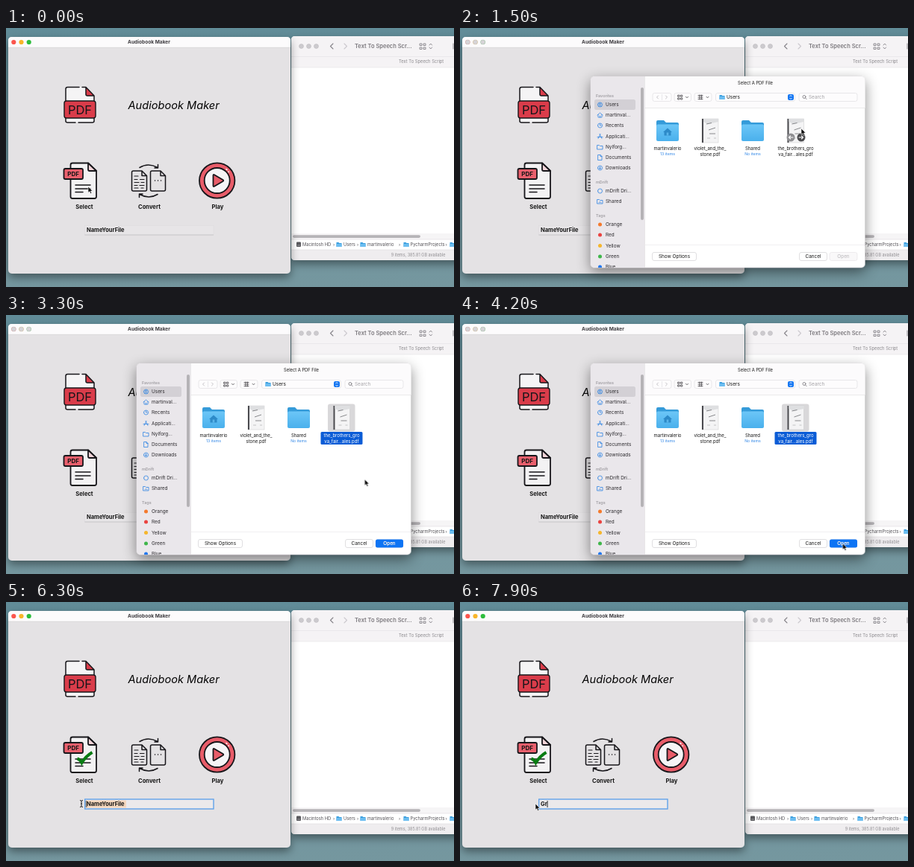
Animation of 600 by 348 pixels, one loop 8 s. Source, as an HTML page:

```html
<!DOCTYPE html>
<html lang="en">
<head>
<meta charset="utf-8">
<title>Audiobook Maker</title>
<style>
html, body { margin: 0; width: 100%; height: 100%; overflow: hidden; background: #5f8894; }
svg { display: block; }
text { font-family: Inter, Roboto, sans-serif; fill: #161616; }
.mid { text-anchor: middle; }
.bold { font-weight: 700; }
.semi { font-weight: 600; }
.line { fill: none; stroke: #17161a; stroke-width: 1.8; stroke-linecap: round; stroke-linejoin: round; }
.thin { fill: none; stroke: #858388; stroke-width: .9; stroke-linecap: round; stroke-linejoin: round; }
.blue { fill: none; stroke: #2f84e2; stroke-width: .8; stroke-linecap: round; stroke-linejoin: round; }
.path text { font-size: 5.75px; fill: #514f54; }
.files text { font-size: 6px; text-anchor: middle; }
.files .sub { font-size: 5.2px; fill: #2f86e6; }

.step, .glide { animation: 8s infinite; }
.step { animation-timing-function: step-end; }
.glide { animation-timing-function: ease-in-out; }
.panel { animation-name: panel; }
.picked { animation-name: picked; }
.hover { animation-name: hover; }
.tick { animation-name: tick; }
.focus { animation-name: focus; }
.name { animation-name: name; }
.first { animation-name: first; }
.second { animation-name: second; }
.arrow { animation-name: arrow; }
.beam { animation-name: beam; }
.pointer { animation-name: pointer; }
.marked { animation-name: marked; transform-origin: 161px 0; }
.caret { animation-name: caret; }
@keyframes panel { 0%, 58.75% { opacity: 0 } 6.25% { opacity: 1 } }
@keyframes picked { 0% { opacity: 0 } 22.5%, 100% { opacity: 1 } }
@keyframes hover { 0%, 37.5% { opacity: 0 } 16.25% { opacity: 1 } }
@keyframes tick { 0% { opacity: 0 } 58.75%, 100% { opacity: 1 } }
@keyframes focus { 0% { opacity: 0 } 71.25%, 100% { opacity: 1 } }
@keyframes name { 0% { opacity: 1 } 95%, 100% { opacity: 0 } }
@keyframes first { 0% { opacity: 0 } 95%, 100% { opacity: 1 } }
@keyframes second { 0% { opacity: 0 } 97.5%, 100% { opacity: 1 } }
@keyframes arrow { 0%, 81.25%, 100% { opacity: 1 } 69% { opacity: 0 } }
@keyframes beam { 0%, 81.25%, 100% { opacity: 0 } 69% { opacity: 1 } }
@keyframes pointer {
  0%, 8.75% { transform: translate(110px, 213px) }
  17.5%, 20% { transform: translate(457px, 135px) }
  26%, 35% { transform: translate(448px, 134px) }
  47.5%, 58.75% { transform: translate(512.5px, 307px) }
  61.25%, 62.5% { transform: translate(514px, 305px) }
  70%, 72.5% { transform: translate(162px, 271px) }
  77.5%, 100% { transform: translate(101px, 271px) }
}
@keyframes marked {
  0%, 72.5% { transform: scaleX(0) }
  77.5%, 100% { transform: scaleX(1) }
}
@keyframes caret {
  0%, 72.5% { transform: translateX(161px) }
  77.5% { transform: translateX(107.5px); animation-timing-function: step-end }
  95% { transform: translateX(114px); animation-timing-function: step-end }
  97.5%, 100% { transform: translateX(117px) }
}
</style>
</head>
<body>
<svg width="600" height="348" viewBox="0 0 600 348">
  <defs>
    <linearGradient id="desk" x2="0" y2="1">
      <stop stop-color="#618c98"/><stop offset="1" stop-color="#75979f"/>
    </linearGradient>
    <linearGradient id="sky" x2="0" y2="1">
      <stop stop-color="#6cc6f7"/><stop offset="1" stop-color="#4ab0ec"/>
    </linearGradient>
    <filter id="soft" x="-10%" y="-10%" width="120%" height="125%">
      <feDropShadow dx="0" dy="5" stdDeviation="6" flood-opacity=".42"/>
    </filter>
    <filter id="deep" x="-12%" y="-12%" width="124%" height="130%">
      <feDropShadow dx="0" dy="6" stdDeviation="9" flood-opacity=".45"/>
    </filter>
    <clipPath id="frame"><rect x="175" y="65" width="367.5" height="257" rx="5"/></clipPath>
    <g id="folder">
      <path d="M-15-12q0-2 2-2h8l3 3H13q2 0 2 2V-5H-15z" fill="#359bd9"/>
      <rect x="-15" y="-8.5" width="30" height="22.5" rx="2" fill="url(#sky)"/>
    </g>
    <g id="dir">
      <path d="M-3.5-3h3l1 1h3v5h-7z" fill="#3b9fdf"/><path d="M-3.5-1h7v4h-7z" fill="#6bbdf0"/>
    </g>
    <g id="book">
      <rect x="-11" y="-16" width="22" height="32" fill="#f4f4f5" stroke="#c9c9cb" stroke-width=".5"/>
      <path d="M-11-16h2v32h-2z" fill="#4a4a4e"/>
      <path d="M-9-16H11v4L-3-9l-6-3z" fill="#dedfe1"/>
      <path d="M-5-9l7-1.500M-2-1l9-3M-1 4h8" fill="none" stroke="#6d6e72" stroke-width=".8"/>
      <path d="M-4 10h4M5 10h3" stroke="#b4b5b8" stroke-width=".8"/>
    </g>
  </defs>

  <rect width="600" height="348" fill="url(#desk)"/>

  <!-- File browser window -->
  <g filter="url(#soft)"><rect x="382" y="11" width="240" height="301" rx="5" fill="#fff"/></g>
  <path d="M382 53V16q0-5 5-5H600V53z" fill="#f5f3f5"/>
  <path d="M382 38.5H600M382 53H600" stroke="#e3e1e4" stroke-width=".6"/>
  <g fill="#cccace" stroke="#b9b7bb" stroke-width=".5">
    <circle cx="395.5" cy="24.5" r="3"/><circle cx="405.5" cy="24.5" r="3"/><circle cx="415.5" cy="24.5" r="3"/>
  </g>
  <path class="thin" d="M438 21l-3.5 3.5L438 28" style="stroke-width:1.1"/>
  <path class="thin" d="M453 21l3.5 3.5L453 28" style="stroke:#cbc9cd;stroke-width:1.1"/>
  <text x="467" y="27.2" font-size="7.5" class="semi" style="fill:#7c797e">Text To Speech Scr...</text>
  <path class="thin" d="M554.5 21h2.5v2.5h-2.5zM559.5 21h2.5v2.5h-2.5zM554.5 26h2.5v2.5h-2.5zM559.5 26h2.5v2.5h-2.5zM567 23l1.8-2 1.8 2M567 26l1.8 2 1.8-2M599 21v7"/>
  <text x="526" y="47.2" font-size="5.8" style="fill:#8a888c">Text To Speech Script</text>
  <path d="M382 276H600V284H382z" fill="#f6f5f6"/>
  <rect x="384" y="278.3" width="171" height="3.6" rx="1.8" fill="#b6b4b7"/>
  <path d="M382 298H600V312H387q-5 0-5-5z" fill="#efedef"/>
  <path d="M382 284H600M382 298H600" stroke="#dddbde" stroke-width=".6"/>
  <g class="path">
    <rect x="389" y="287.5" width="6" height="6.5" rx="1" fill="#59595d"/><path d="M390 292h4" stroke="#bbb" stroke-width=".7"/>
    <text x="397" y="293">Macintosh HD</text><text x="438" y="293">›</text>
    <use href="#dir" x="446" y="291"/><text x="452" y="293">Users</text><text x="470" y="293">›</text>
    <use href="#dir" x="478" y="291"/><text x="484" y="293">martinvalerio</text><text x="526" y="293">›</text>
    <use href="#dir" x="536" y="291"/><text x="541.5" y="293">PycharmProjects</text><text x="588.5" y="293">›</text>
    <use href="#dir" x="598" y="291"/>
    <text x="552" y="307" class="mid" style="font-size:5.5px;fill:#908e92">9 items, 385.81 GB available</text>
  </g>

  <!-- Main window -->
  <g filter="url(#soft)"><rect x="3" y="12" width="378" height="318" rx="5" fill="#e4e2e4"/></g>
  <path d="M3 26V17q0-5 5-5H376q5 0 5 5V26z" fill="#fcfbfc"/>
  <path d="M3 26.2H381" stroke="#d5d3d6" stroke-width=".6"/>
  <circle cx="10.3" cy="19" r="3.1" fill="#fb554d"/><circle cx="20.5" cy="19" r="3.1" fill="#f8b52a"/><circle cx="30.7" cy="19" r="3.1" fill="#2ebd3d"/>
  <text x="191.5" y="21.2" font-size="6.6" class="mid bold" style="fill:#3d3b3f">Audiobook Maker</text>
  <text x="163.5" y="109" font-size="14.6" font-style="italic" style="fill:#050505">Audiobook Maker</text>

  <g>
    <path d="M80 98V82q0-2.500 2.500-2.500H107L118 91V125q0 2-2.500 2H82.500Q80 127 80 125z" fill="#f5f4f5"/>
    <path d="M107 79.500L118 91H109q-2 0-2-2z" fill="#da3c4a"/>
    <path class="line" style="stroke-width:1.5" d="M80 98V82q0-2.500 2.500-2.500H98M102 79.500h5L118 91v7M107 80v9q0 2 2 2h9M80 121v4q0 2 2.500 2H93M97 127h18.500q2.500 0 2.500-2v-4"/>
    <rect class="line" style="fill:#da3c4a;stroke-width:1.4" x="78" y="98" width="42" height="23" rx="3"/>
    <text x="99" y="116" font-size="16.5" class="mid" style="fill:#17161a">PDF</text>
  </g>

  <g class="line">
    <path d="M86.500 190v-6q0-2.500 2.500-2.500h21L121 192v34.500q0 2.500-2.500 2.500H89q-2.500 0-2.500-2.500z" fill="#f3f2f3"/>
    <path d="M110 181.500V190q0 2 2 2h9z" fill="#f0d3d7"/>
    <path d="M93 211h20M93 216h20M93 220.500h10" stroke-width="1.500"/>
    <rect x="77.500" y="189" width="25.500" height="14" rx="2" fill="#e9606d"/>
  </g>
  <text x="90.200" y="199" font-size="8" class="mid bold">PDF</text>
  <path class="tick step" d="M95.500 210.500q4 1 6 5.500Q107 207 115.500 202" fill="none" stroke="#087c12" stroke-width="4"/>

  <g class="line" style="stroke-width:1.500">
    <path d="M168.500 194q0-2 2-2H182l6.500 6.500V217q0 2-2 2h-16q-2 0-2-2zM182 192v6.500h6.500"/>
    <path d="M193.500 194q0-2 2-2H207l6.500 6.500V217q0 2-2 2h-16q-2 0-2-2zM207 192v6.500h6.500"/>
    <path d="M172 199h5M172 203.500h4M179.500 203.500h5.500M172 207.500h6M181 207.500h4M172 211.500h4M179 211.500h6M172 215h5M181 215h3" stroke-width="1.200"/>
    <path d="M199.500 205h.1M203.500 205h.1M207.500 205h.1"/>
    <path d="M179 187.500q11.500-7 24 0M203.500 183.500v4.500h-4.500M203 223.500q-11.500 7-24 0M178.500 227.500V223h4.500"/>
  </g>

  <g class="line">
    <circle cx="282.700" cy="205" r="23.700" fill="#e85c69"/>
    <circle cx="282.700" cy="205" r="17" fill="#f6f4f6"/>
    <path d="M277.500 198v14q0 1.500 1.500.7l11.500-6.700q1.500-1 0-2l-11.500-6.700q-1.500-.8-1.500.7z" fill="#e85c69"/>
    <path d="M295 189.500l1 1M298 193l.3.4" stroke="#fff" stroke-width="1.500"/>
  </g>

  <g class="mid bold" font-size="7.6">
    <text x="105" y="243.400">Select</text><text x="192" y="243.400">Convert</text><text x="283.500" y="243.400">Play</text>
  </g>

  <rect x="105.500" y="265.200" width="172.500" height="12.800" fill="#e7e5e7" stroke="#dbd9dc" stroke-width=".5"/>
  <path d="M105.500 278H278" stroke="#bcbabd" stroke-width=".7"/>
  <g class="focus step">
    <rect x="105.700" y="265" width="172.300" height="13" fill="#ebe9eb" stroke="#62a3ea" stroke-width="1.400"/>
    <g class="name step"><rect class="marked glide" x="107" y="266.500" width="54" height="10" fill="#f3d6bd"/></g>
    <rect class="caret glide" x="-.4" y="267" width=".9" height="9" fill="#111"/>
  </g>
  <g class="bold" font-size="7.5">
    <text class="name step" x="108" y="274">NameYourFile</text>
    <text class="first step" x="108" y="274">G</text>
    <text class="second step" x="113.800" y="274">r</text>
  </g>

  <!-- File chooser -->
  <g class="panel step">
    <g fill="#d6d4d7" stroke="#c4c2c5" stroke-width=".5">
      <circle cx="10.300" cy="19" r="3"/><circle cx="20.500" cy="19" r="3"/><circle cx="30.700" cy="19" r="3"/>
    </g>
    <g filter="url(#deep)"><rect x="175" y="65" width="367.500" height="257" rx="5" fill="#fff" stroke="#b5b3b6" stroke-width=".4"/></g>
    <g clip-path="url(#frame)">
      <path d="M175 65h72.500v260H175z" fill="#eae7eb"/>
      <path d="M247.500 65H543v42.500H247.500z" fill="#fcfbfc"/>
      <path d="M247.500 107.500H543M247.500 65V323" stroke="#dfdde0" stroke-width=".6"/>
      <path d="M247.500 291.500H543" stroke="#ebe9ec" stroke-width=".7"/>
      <rect x="242" y="80" width="4" height="178" rx="2" fill="#b5b3b6"/>
      <rect x="180" y="96" width="55" height="14" rx="2.500" fill="#d3d0d5"/>
      <g id="side"></g>
    </g>
    <text x="395.500" y="75.900" font-size="5.800" class="mid">Select A PDF File</text>
    <g fill="#fdfcfd" stroke="#dcdadd" stroke-width=".6">
      <rect x="258" y="87.500" width="25" height="11" rx="2.500"/><rect x="287" y="87.500" width="22.500" height="11" rx="2.500"/>
      <rect x="314" y="87.500" width="23" height="11" rx="2.500"/><rect x="342.500" y="87.500" width="106" height="11" rx="2.500"/>
      <rect x="454" y="87.500" width="78" height="11" rx="2.500"/><path d="M270.500 89v8"/>
    </g>
    <path class="thin" style="stroke:#bfbdc1" d="M265.500 91l-2 2 2 2M275.500 91l2 2-2 2"/>
    <path class="thin" style="stroke:#57555a" d="M292 90.200h2v2h-2zM295.800 90.200h2v2h-2zM292 94h2v2h-2zM295.800 94h2v2h-2zM302.500 92.300l1.500 1.500 1.500-1.500M319 90.500h6M319 93h6M319 95.500h6M321 90v6M323.500 90v6M330 92.300l1.500 1.500 1.500-1.500"/>
    <use href="#dir" x="351" y="93"/><text x="357" y="95.300" font-size="6.500">Users</text>
    <rect x="439" y="89" width="8" height="8" rx="2" fill="#1677f2"/>
    <path d="M441.500 92l1.500-1.500 1.500 1.500M441.500 94l1.500 1.500 1.500-1.500" fill="none" stroke="#fff" stroke-width=".9"/>
    <g class="thin"><circle cx="461" cy="92.500" r="2"/><path d="M462.500 94l1.700 1.700"/></g>
    <text x="467" y="95.300" font-size="6.400" style="fill:#a3a1a5">Search</text>

    <rect class="picked step" x="431" y="119.500" width="36.500" height="37" rx="3" fill="#d9d8da"/>
    <use href="#folder" x="278" y="138"/><use href="#book" x="335" y="138"/>
    <use href="#folder" x="392" y="138"/><use href="#book" x="449.500" y="138"/>
    <path d="M272 140l6-5.500 6 5.500h-1.500v4.500h-9V140z" fill="#2d8ac8"/><path d="M276.700 140.500h2.600v4h-2.600z" fill="#59b4ea"/>
    <g class="files">
      <text x="278" y="163.500">martinvalerio</text><text x="278" y="171" class="sub">13 items</text>
      <text x="335" y="163.500">violet_and_the_</text><text x="335" y="171.700">stone.pdf</text>
      <text x="392" y="163.500">Shared</text><text x="392" y="171" class="sub">No items</text>
      <text x="449.500" y="163.500">the_brothers_gro</text><text x="449.500" y="171.700">va_fair...ales.pdf</text>
      <g class="picked step">
        <rect x="421.500" y="157" width="56" height="17" rx="1.500" fill="#0b5cd6"/>
        <text x="449.500" y="163.500" style="fill:#fff">the_brothers_gro</text><text x="449.500" y="171.700" style="fill:#fff">va_fair...ales.pdf</text>
      </g>
    </g>
    <g class="hover step" stroke="#fff" stroke-width="1.100" fill="none" stroke-linecap="round">
      <circle cx="443" cy="147" r="5.500" fill="#8f8f92" stroke="none"/><circle cx="457" cy="147" r="5.500" fill="#4a4a4d" stroke="none"/>
      <path d="M446 147h-5.500m2-2l-2 2 2 2M454 147h5.500m-2-2l2 2-2 2"/>
    </g>

    <g fill="#fff" stroke="#d3d1d4" stroke-width=".7">
      <rect x="257.500" y="301.500" width="59" height="11" rx="2.500"/><rect x="454.500" y="301.500" width="37" height="11" rx="2.500"/>
      <rect x="495" y="301.500" width="37" height="11" rx="2.500" fill="#f9f8f9" stroke="#e8e6e9"/>
    </g>
    <rect class="picked step" x="495" y="301.500" width="37" height="11" rx="2.500" fill="#0d74f4"/>
    <g class="mid" font-size="6.400">
      <text x="287" y="309.300">Show Options</text><text x="473" y="309.300">Cancel</text>
      <text x="513.500" y="309.300" style="fill:#b9b7bb">Open</text>
      <text class="picked step" x="513.500" y="309.300" style="fill:#fff">Open</text>
    </g>
  </g>

  <g class="pointer glide">
    <path class="arrow step" d="M0 0V8.300L1.900 6.600 3.200 9.500 4.700 8.800 3.400 6H6z" fill="#0b0b0b" stroke="#fff" stroke-width=".6"/>
    <path class="beam step" d="M-2-4.500q2 0 2 1.200 0-1.200 2-1.200M0-3.500v7M-2 4.500q2 0 2-1.200 0 1.200 2 1.200M-1 0h2" fill="none" stroke="#222" stroke-width="1"/>
  </g>
</svg>
<script>
const ring = 'M-3 0a3 3 0 1 0 6 0a3 3 0 1 0-6 0';
const folder = 'M-3.5-2.500h2.500l1 1h3.500v4.500h-7z';
const rows = [
  ['Favorites', 92.5],
  ['Users', 103, ring + 'M-1.8 2q1.800-2 3.600 0M-1-.8a1 1 0 1 0 2 0a1 1 0 1 0-2 0'],
  ['martinval...', 117, 'M-3.500 0L0-3 3.500 0M-2.500-.5V3h5V-.5M0 3V1'],
  ['Recents', 131, ring + 'M0-2V0h1.500'],
  ['Applicati...', 145.5, 'M-2.500 3L.5-3M2.500 3L-.5-3M-3.500 1h7'],
  ['Nylforg...', 160, folder],
  ['Documents', 174, 'M-2.500-3.500H.5l2 2v5h-5zM.5-3.500v2h2'],
  ['Downloads', 188, ring + 'M0-1.600V1.500M-1.300.3L0 1.600 1.300.3'],
  ['mDrift', 209],
  ['mDrift Dri...', 219, ring],
  ['Shared', 233, folder + 'M-1.500 1.500q1.500-2 3 0'],
  ['Tags', 254],
  ['Orange', 264, '', '#f4792c'],
  ['Red', 278, '', '#ea4340'],
  ['Yellow', 292.5, '', '#f6b62c'],
  ['Green', 307, '', '#3fb54a'],
  ['Blue', 321, '', '#2378ee'],
];
document.getElementById('side').innerHTML = rows.map(([label, y, icon, tag]) => {
  if (icon === undefined)
    return `<text x="182" y="${y}" font-size="5.400" class="semi" style="fill:#a09ea3">${label}</text>`;
  const mark = tag
    ? `<circle cx="187.500" cy="${y}" r="2.500" fill="${tag}"/>`
    : `<path class="blue" transform="translate(187.500 ${y})" d="${icon}"/>`;
  return `${mark}<text x="195" y="${y + 2.3}" font-size="6.400" style="fill:#2b292d">${label}</text>`;
}).join('');
</script>
</body>
</html>
```
